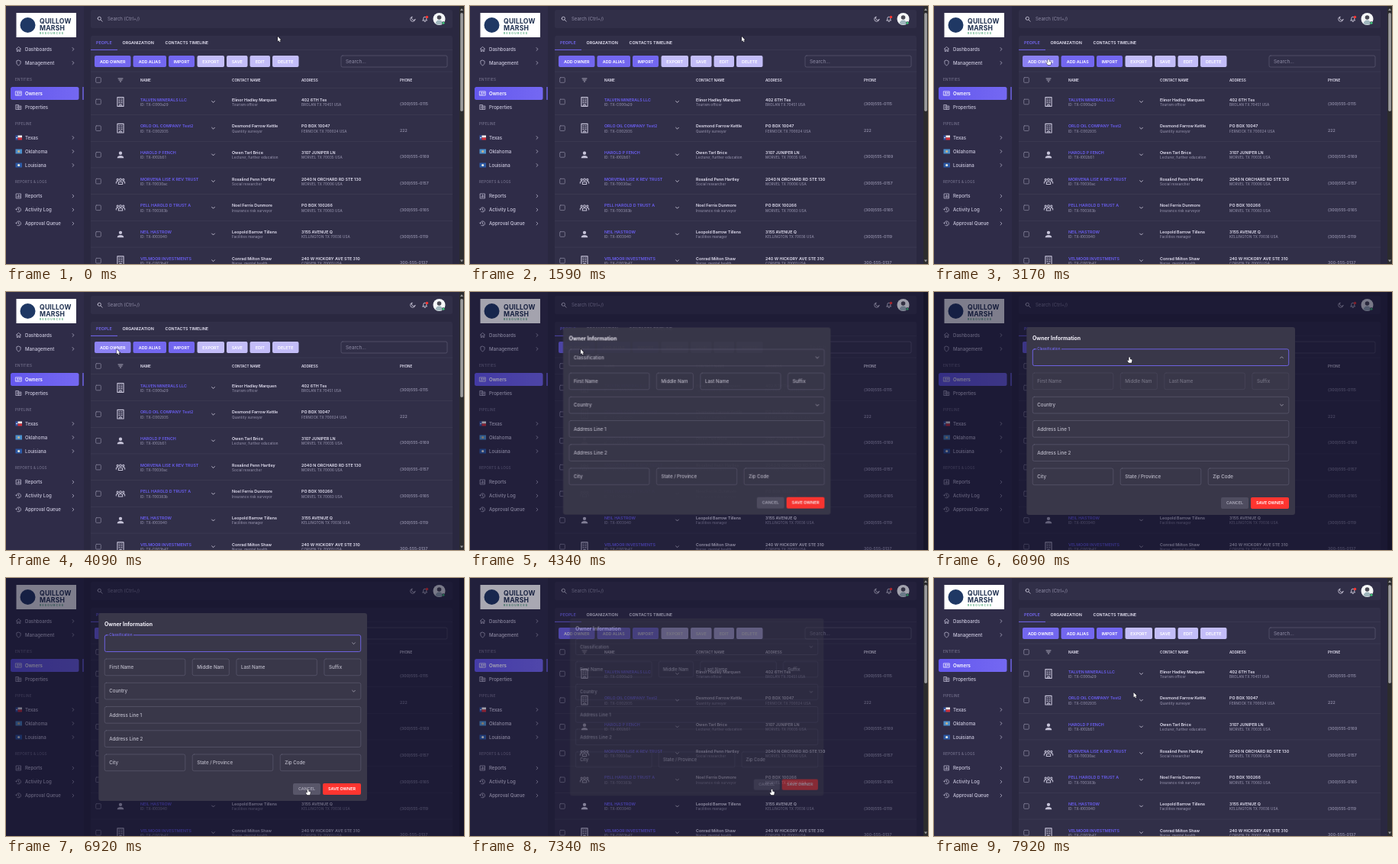
Write an HTML page with a canvas that moves like this. It is 600 by 338 pixels and loops after 8000 ms.

```html
<!DOCTYPE html>
<html lang="en">
<head>
<meta charset="utf-8">
<title>Owners</title>
<style>
html, body { margin: 0; width: 100%; height: 100%; overflow: hidden; background: #2a2840; }
canvas { display: block; width: 600px; height: 338px; }
</style>
</head>
<body>
<canvas id="stage"></canvas>
<script>
const W = 600, H = 338, LOOP = 8000;
const FONT = 'Inter, "Open Sans", sans-serif';
const C = {
  side: '#2f2c48', body: '#2a2840', card: '#312f48', line: '#434059',
  text: '#e4e1f2', nav: '#cbc8de', mute: '#8f8ca6', dim: '#77748f',
  main: '#7367f0', soft: '#c3bdf8', modal: '#393749', field: '#66647a', label: '#bfbdcb', red: '#ff3530'
};
const ICON = {
  home: 'M4 11L12 4l8 7M6 10v10h4v-6h4v6h4V10',
  shield: 'M12 3l7 3v5c0 5-3 8-7 10c-4-2-7-5-7-10V6z',
  card: 'M2 5h20v14H2zM14 9h5M14 13h5M5 16h7M7 10a2 2 0 1 0 4 0a2 2 0 1 0-4 0',
  office: 'M3 4h9v16H3zM12 8h9v12h-9M6 8h3M6 12h3M6 16h3M15 12h3M15 16h3',
  chart: 'M4 4h16v16H4zM8 16v-4M12 16V8M16 16v-6',
  clock: 'M4 12a8 8 0 1 1 3 6M1.500 9.500L4 12l2.500-2.500M12 8v5l3 2',
  right: 'M9 6l6 6-6 6',
  down: 'M6 9l6 6 6-6',
  search: 'M4 10a6 6 0 1 0 12 0a6 6 0 1 0-12 0M15 15l6 6',
  moon: 'M20 14A8.500 8.500 0 1 1 10 4a7 7 0 0 0 10 10z',
  bell: 'M5 17h14l-2-2.500V10a5 5 0 0 0-10 0v4.500zM10.500 20.500h3',
  filter: 'M3 6h18M6 12h12M10 18h4',
  tower: 'M5 2h14v20H5zM8.500 6h2M13.500 6h2M8.500 10h2M13.500 10h2M8.500 14h2M13.500 14h2M10 22v-4h4v4',
  person: 'M12 4a4 4 0 1 1 0 8a4 4 0 1 1 0-8M4 20c0-4 4-6 8-6s8 2 8 6z',
  group: 'M9.500 8a2.500 2.500 0 1 0 5 0a2.500 2.500 0 1 0-5 0M3 8a2 2 0 1 0 4 0a2 2 0 1 0-4 0M17 8a2 2 0 1 0 4 0a2 2 0 1 0-4 0M7 19v-3c0-4 10-4 10 0v3zM1.500 17v-2c0-2 2-3 4-2.500M22.500 17v-2c0-2-2-3-4-2.500'
};
const ROWS = [
  ['tower', 'TALVEN MINERALS LLC', 'TX-C000a29', 'Elinor Hadley Marquen', 'Tourism officer', '402 6TH Tes', 'BROLAN TX 70451 USA', '(300)555-0115'],
  ['tower', 'ORLO OIL COMPANY Test2', 'TX-C002935', 'Desmond Farrow Kettle', 'Quantity surveyor', 'PO BOX 10047', 'FERNOCK TX 700024 USA', '222'],
  ['person', 'HAROLD P FENCH', 'TX-I002b51', 'Owen Tarl Brice', 'Lecturer, further education', '3107 JUNIPER LN', 'MORVEL TX 70035 USA', '(300)555-0169'],
  ['group', 'MORVENA LISE K REV TRUST', 'TX-T0030ac', 'Rosalind Penn Hartley', 'Social researcher', '2040 N ORCHARD RD STE 130', 'MORVEL TX 70006 USA', '(300)555-0157'],
  ['group', 'PELL HAROLD D TRUST A', 'TX-T00383b', 'Noel Ferris Dunmore', 'Insurance risk surveyor', 'PO BOX 100266', 'MORVEL TX 70083 USA', '(300)555-0165'],
  ['person', 'NEIL HASTROW', 'TX-I003940', 'Leopold Barrow Tillens', 'Facilities manager', '3155 AVENUE Q', 'KELLINGTON TX 70036 USA', '(300)555-0119'],
  ['tower', 'VELMOOR INVESTMENTS', 'TX-C003b47', 'Conrad Milton Shaw', 'Nurse, mental health', '240 W HICKORY AVE STE 310', 'CORVEN TX 70001 USA', '300-555-0137']
];
const BUTTONS = [
  ['ADD OWNER', 116, 163.5], ['ADD ALIAS', 166.5, 210], ['IMPORT', 213, 247],
  ['EXPORT', 250.5, 286, 1], ['SAVE', 289, 316.5, 1], ['EDIT', 319.5, 346, 1], ['DELETE', 349, 383.5, 1]
];
// time, x, y
const PATH = [
  [0, 356, 40], [1960, 356, 40], [2130, 327, 49], [2380, 327, 49], [3170, 150, 69.5], [3800, 150, 69.5],
  [4090, 145, 75], [4800, 145, 75], [5230, 255, 83.5], [6050, 255, 83.5], [6840, 395.5, 276.5],
  [7380, 395.5, 276.5], [7900, 261.5, 150], [LOOP, 261.5, 150]
];
const HANDS = [[2900, 4080], [5050, 6150], [6720, 7420]];
const HOVER = [2900, 4240], LOCKED = [4210, 7260];

const dpr = window.devicePixelRatio || 1;
const sheet = el => {
  el.width = W * dpr; el.height = H * dpr;
  const c = el.getContext('2d');
  c.scale(dpr, dpr);
  c.lineCap = c.lineJoin = 'round';
  return c;
};
const stage = sheet(document.getElementById('stage'));
const layer = sheet(document.createElement('canvas'));
let g = stage;

const span = (t, a, b) => Math.min(1, Math.max(0, (t - a) / (b - a)));
const smooth = u => u * u * (3 - 2 * u);
const mix = (a, b, u) => a + (b - a) * u;
const within = (t, [a, b]) => t >= a && t < b;

// y is the middle of the capitals
function text(s, x, y, size, color, weight = 400, gap = 0, align = 'left') {
  g.font = `${weight} ${size}px ${FONT}`;
  g.letterSpacing = gap + 'px';
  g.textAlign = align;
  g.fillStyle = color;
  g.fillText(s, x, y + size * 0.364);
}
function rect(x, y, r, b, color) {
  g.fillStyle = color;
  g.fillRect(x, y, r - x, b - y);
}
function round(x, y, r, b, rad, fill, stroke, lw = 0.5) {
  g.beginPath();
  g.roundRect(x, y, r - x, b - y, rad);
  if (fill) { g.fillStyle = fill; g.fill(); }
  if (stroke) { g.strokeStyle = stroke; g.lineWidth = lw; g.stroke(); }
}
function disc(x, y, r, color) {
  g.beginPath();
  g.arc(x, y, r, 0, 7);
  g.fillStyle = color;
  g.fill();
}
function icon(name, x, y, size, color, { lw = 2, fill = false, turn = 0 } = {}) {
  g.save();
  g.translate(x, y);
  g.rotate(turn);
  g.scale(size / 24, size / 24);
  g.translate(-12, -12);
  const p = new Path2D(ICON[name]);
  g.lineWidth = lw;
  g.strokeStyle = g.fillStyle = color;
  fill ? g.fill(p) : g.stroke(p);
  g.restore();
}

function flag(kind, y) {
  const x = 12.5, top = y - 3;
  if (kind === 'Texas') {
    rect(x, top, x + 3, top + 6, '#3054a8');
    rect(x + 3, top, x + 8.5, top + 3, '#f2f2f2');
    rect(x + 3, top + 3, x + 8.5, top + 6, '#d0323c');
    disc(x + 1.5, y, 0.8, '#fff');
  } else {
    rect(x, top, x + 8.5, top + 6, kind === 'Oklahoma' ? '#4c8fcb' : '#2d5aa6');
    disc(x + 4.2, y, 1.5, kind === 'Oklahoma' ? '#c9b48a' : '#f0eee0');
  }
}

function sidebar() {
  rect(0, 0, 102, H, C.side);
  rect(13.5, 9, 92, 41, '#fff');
  disc(28.5, 25, 10, '#1f3864');
  text('QUILLOW', 44, 20, 8.6, '#1f3050', 700, 0.2);
  text('MARSH', 44, 28.7, 8.6, '#1f3050', 700, 0.2);
  text('RESOURCES', 44, 35.3, 3.4, '#3f9f6c', 600, 1.3);

  [['ENTITIES', 96], ['PIPELINE', 154], ['REPORTS & LOGS', 230]]
    .forEach(([s, y]) => text(s, 12, y, 4.6, C.dim, 500, 0.2));

  const glow = g.createLinearGradient(6, 0, 95, 0);
  glow.addColorStop(0, '#6458ee');
  glow.addColorStop(1, '#7468f2');
  round(6, 106, 95.5, 123, 2.5, glow);
  round(100.3, 106, 101.7, 123, 0.6, C.main);

  const item = (s, y, ic, arrow) => {
    const on = s === 'Owners';
    text(s, 25, y, 6.1, on ? '#fff' : C.nav, on ? 600 : 500);
    if (ic) icon(ic, 16.5, y, 9, on ? '#fff' : C.nav, { lw: 1.8 });
    else flag(s, y);
    if (arrow) icon('right', 88, y, 7.5, C.nav, { lw: 2.2 });
  };
  item('Dashboards', 56.5, 'home', 1);
  item('Management', 74.5, 'shield', 1);
  item('Owners', 114.5, 'card');
  item('Properties', 132.5, 'office');
  item('Texas', 172.5, '', 1);
  item('Oklahoma', 190.5, '', 1);
  item('Louisiana', 208.5, '', 1);
  item('Reports', 249, 'chart', 1);
  item('Activity Log', 267, 'clock', 1);
  item('Approval Queue', 285, 'clock', 1);
}

function topbar() {
  round(111, 5, 585, 29, 2.5, C.card);
  icon('search', 123, 17, 8.5, C.text);
  text('Search (Ctrl+/)', 133, 17, 6, C.mute);
  icon('moon', 533, 17, 9, C.text);
  icon('bell', 548.8, 17, 9.5, C.text);
  disc(551.5, 14.5, 1.7, C.red);
  disc(567.5, 17, 8, '#f5f7f8');
  g.save();
  g.beginPath();
  g.arc(567.5, 17, 7.5, 0, 7);
  g.clip();
  disc(567.5, 15, 2.8, '#4a4a55');
  disc(567.5, 23.5, 5, '#9fb6bd');
  g.restore();
  disc(573, 22.3, 2, C.card);
  disc(573, 22.3, 1.5, '#3fc87a');
}

function toolbar(t) {
  text('PEOPLE', 118, 48.5, 5.4, C.main, 600);
  text('ORGANIZATION', 152.5, 48.5, 5.4, C.text, 600);
  text('CONTACTS TIMELINE', 208.5, 48.5, 5.4, C.text, 600);
  rect(111, 57.4, 585, 57.9, C.line);
  rect(111, 56.9, 146, 57.9, C.main);
  const x = cursor(t)[0];
  for (const [s, a, b, off] of BUTTONS) {
    round(a, 65, b, 80, 2, off ? C.soft : C.main);
    if (!off && within(t, HOVER) && x > a && x < b) {
      round(a, 65, b, 80, 2, 'rgba(255,255,255,.17)');
      const u = span(t, 3820, 4120);
      if (u > 0 && u < 1) {
        g.save();
        g.beginPath();
        g.roundRect(a, 65, b - a, 15, 2);
        g.clip();
        disc(x, 73, 40 * u, `rgba(255,255,255,${0.16 * (1 - u)})`);
        g.restore();
      }
    }
    text(s, (a + b) / 2, 72.6, 5.4, '#fff', 600, 0, 'center');
  }
  round(439, 65, 578, 80, 2, null, '#6d6a82');
  text('Search...', 445, 72.5, 6.4, C.mute);
}

function table() {
  rect(111, 85.8, 585, 86.3, C.line);
  rect(111, 107.3, 585, 107.8, C.line);
  const box = y => round(117.7, y - 3.3, 124.3, y + 3.3, 1, null, '#85829a', 0.8);
  box(97);
  icon('filter', 150, 97, 8, C.text);
  [['NAME', 176], ['CONTACT NAME', 296], ['ADDRESS', 387], ['PHONE', 516]]
    .forEach(([s, x]) => text(s, x, 97, 4.6, C.text, 600));

  ROWS.forEach(([ic, name, id, who, job, street, town, phone], i) => {
    const y = 125.5 + i * 34.7;
    box(y);
    icon(ic, 150, y, ic === 'tower' ? 14 : 13, '#c6c3d8', { lw: 1.9, fill: ic === 'person' });
    icon('down', 271.5, y, 7.5, C.text, { lw: 2.4 });
    const pair = (a, b, x, color) => {
      text(a, x, y - 2.8, 5.35, color, 600);
      text(b, x, y + 3.7, 4.5, C.mute, 500, 0.1);
    };
    pair(name, 'ID: ' + id, 176, '#6a5ef0');
    pair(who, job, 296, C.text);
    pair(street, town, 387, C.text);
    text(phone, 516, y + 2.7, 5.2, C.mute, 600);
    rect(111, y + 16.8, 585, y + 17.3, C.line);
  });
}

function scrollbar() {
  rect(594, 0, W, H, '#2c2c2e');
  round(595.2, 9, 598.9, 138, 1.8, '#9c9c9e');
  g.fillStyle = '#9c9c9e';
  for (const [y, d] of [[4.5, -1.5], [334, 1.5]]) {
    g.beginPath();
    g.moveTo(595, y - d);
    g.lineTo(599, y - d);
    g.lineTo(597, y + d);
    g.fill();
  }
}

function page(t) {
  rect(0, 0, W, H, C.body);
  sidebar();
  topbar();
  round(111, 39, 585, H + 5, 2.5, C.card);
  toolbar(t);
  table();
}

function field(label, x, y, r, pick) {
  round(x + 0.2, y, r - 0.2, y + 21.7, 2.2, null, C.field, 0.55);
  text(label, x + 6.2, y + 10.9, 6.2, C.label, 500);
  if (pick) icon('down', 455.5, y + 10.9, 7.5, C.label, { lw: 2.2 });
}

function classField(t) {
  const u = smooth(span(t, 5280, 5430)) - smooth(span(t, 7110, 7260));
  if (!u) return field('Classification', 129, 74.8, 465, true);
  round(129.3, 74.8, 464.7, 96.5, 2.2, null, C.main, 0.9);
  const size = mix(6.2, 4.7, u), y = mix(85.7, 74.3, u);
  if (u > 0.7) rect(134.3, 74, 167, 75.8, C.modal);
  text('Classification', 135.2, y, size, u > 0.7 ? C.main : C.label, 500);
  const turn = smooth(span(t, 5270, 5420)) - smooth(span(t, 6100, 6250));
  icon('down', 455.5, 85.7, 7.5, C.label, { lw: 2.2, turn: turn * Math.PI });
}

function modal(t) {
  g.clearRect(0, 0, W, H);
  round(121.3, 46, 473, 292, 3, C.modal);
  text('Owner Information', 129, 60, 6.9, '#f4f2fb', 700);
  classField(t);
  g.globalAlpha = 1 - 0.55 * (span(t, 5270, 5340) - span(t, 6100, 6220));
  field('First Name', 129, 106, 235);
  field('Middle Nam', 244, 106, 292.5);
  field('Last Name', 301.7, 106, 407.5);
  field('Suffix', 416.7, 106, 465);
  g.globalAlpha = 1;
  field('Country', 129, 137.3, 465, true);
  field('Address Line 1', 129, 168.5, 465);
  field('Address Line 2', 129, 199.8, 465);
  field('City', 129, 231, 235);
  field('State / Province', 244, 231, 350);
  field('Zip Code', 359, 231, 465);
  round(376, 269, 412, 284, 2, t > 6740 ? '#585669' : '#4f4d60');
  text('CANCEL', 394, 276.5, 5.4, '#aaa8b8', 600, 0, 'center');
  round(415, 269, 465, 284, 2, C.red);
  text('SAVE OWNER', 440, 276.5, 5.4, '#fff', 600, 0, 'center');
}

function overlay(t) {
  const shade = span(t, 4200, 4400) - span(t, 7260, 7500);
  if (shade > 0) rect(0, 0, W, H, `rgba(12,10,38,${0.53 * shade})`);
  const show = t < 6000 ? 1 - (1 - span(t, 4200, 4410)) ** 3 : 1 - span(t, 7248, 7374) ** 2;
  if (show <= 0) return;
  g = layer;
  modal(t);
  g = stage;
  const k = 0.9 + 0.1 * show;
  g.save();
  g.globalAlpha = show;
  g.translate(297, 169);
  g.scale(k, k);
  g.drawImage(layer.canvas, -297, -169, W, H);
  g.restore();
}

function cursor(t) {
  const i = PATH.findIndex(p => t < p[0]);
  const a = PATH[i - 1], b = PATH[i];
  const u = smooth(span(t, a[0], b[0]));
  return [mix(a[1], b[1], u), mix(a[2], b[2], u)];
}

function pointer(t) {
  const [x, y] = cursor(t);
  const hand = HANDS.some(h => within(t, h));
  const p = new Path2D(hand
    ? 'M-.8 .8Q0-.3 .8 .8V3l2.200 .6Q3.400 3.800 3.300 5L2.700 7.800H-1L-2.800 5Q-2.600 3.900-.8 5z'
    : 'M0 0V6.200L1.500 4.900L2.500 7.200L3.500 6.700L2.500 4.500H4.400z');
  g.save();
  g.translate(x, y);
  g.lineWidth = 0.9;
  g.strokeStyle = '#15141c';
  g.stroke(p);
  g.fillStyle = '#fff';
  g.fill(p);
  g.restore();
}

function draw(now) {
  const t = now % LOOP;
  const locked = within(t, LOCKED);
  page(t);
  if (locked) rect(594, 0, W, H, '#1f1e2c');
  overlay(t);
  if (!locked) scrollbar();
  pointer(t);
}

const start = performance.now();
function tick() {
  draw(performance.now() - start);
  requestAnimationFrame(tick);
}
tick();
</script>
</body>
</html>
```
